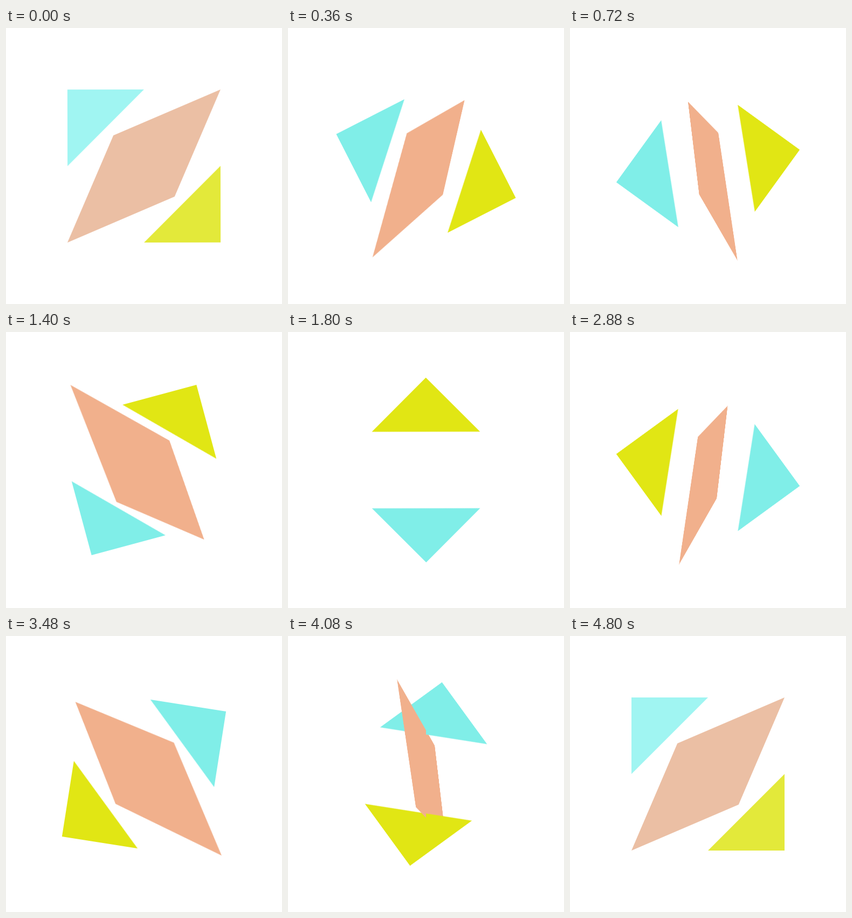
Animation, 512 px wide and 512 px high, one loop 4.84 s. Source, as an HTML page:

```html
<!DOCTYPE html>
<html lang="en">
<head>
<meta charset="utf-8">
<title>Turning shapes</title>
<style>
  :root {
    --size: 142px;
    --loop: 4840ms linear infinite;
  }

  html, body {
    margin: 0;
    width: 100%;
    height: 100%;
    overflow: hidden;
    background: #fff;
  }

  .stage {
    position: absolute;
    inset: 0;
    perspective: 710px;
  }

  .scene {
    position: absolute;
    left: calc(50% - var(--size));
    top: calc(50% - var(--size));
    width: calc(2 * var(--size));
    height: calc(2 * var(--size));
    transform-style: preserve-3d;
  }

  .shape {
    position: absolute;
    background: var(--color);
  }

  .corner {
    width: 50%;
    height: 50%;
    clip-path: polygon(100% 0, 100% 100%, 0 100%);
    animation: orbit var(--loop), tint var(--loop);
  }

  .cyan {
    --color: #80eee8;
    --pale: #a0f5f2;
    left: 0;
    top: 0;
    rotate: 180deg;
  }

  .yellow {
    --color: #e1e614;
    --pale: #e3e93a;
    right: 0;
    bottom: 0;
  }

  .kite {
    --color: #f1b08c;
    --pale: #ebbfa4;
    inset: 0;
    clip-path: polygon(100% 0, 30% 30%, 0 100%, 70% 70%);
    animation: flip var(--loop), tint var(--loop);
  }

  /* 4800 ms of motion, then a 40 ms hold */
  @keyframes orbit {
    0% { transform: translate(0, 0) rotate(0deg); }
    24.7934% { transform: translate(0, -142px) rotate(-90deg); }
    49.5868% { transform: translate(-142px, -142px) rotate(-180deg); }
    74.3802% { transform: translate(-142px, 0) rotate(-270deg); }
    99.1736%, 100% { transform: translate(0, 0) rotate(-360deg); }
  }

  @keyframes flip {
    0% { transform: rotateY(0deg); }
    99.1736%, 100% { transform: rotateY(720deg); }
  }

  @keyframes tint {
    0%, 99.1736%, 100% { background-color: var(--pale); }
    5%, 94.2% { background-color: var(--color); }
  }
</style>
</head>
<body>
  <div class="stage">
    <div class="scene">
      <div class="shape corner cyan"></div>
      <div class="shape kite"></div>
      <div class="shape corner yellow"></div>
    </div>
  </div>
</body>
</html>
```
